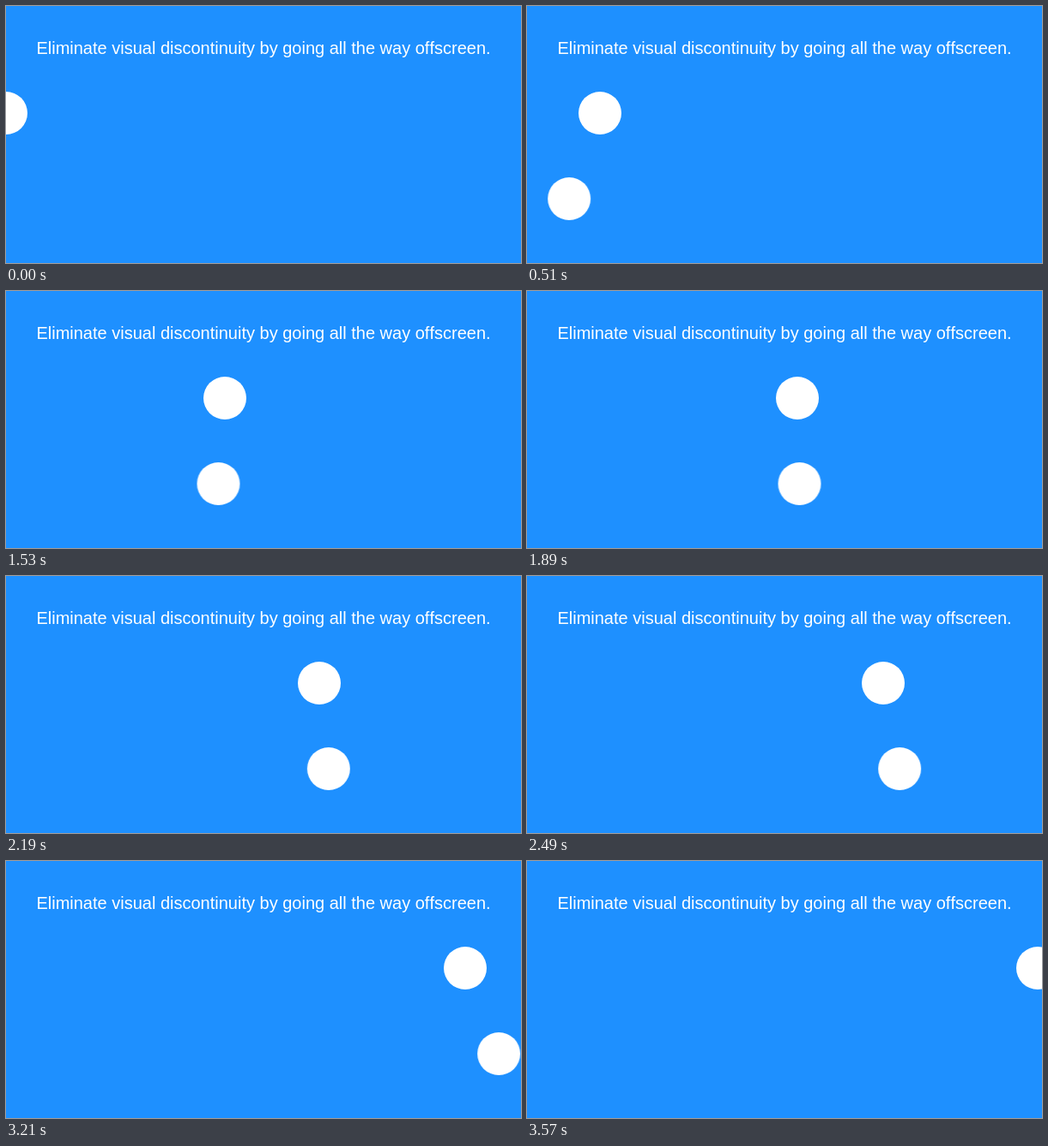
Animation of 600x300 px, one loop 3600 ms. Source, as an HTML page:

```html
<!DOCTYPE html>
<html lang="en">
<head>
<meta charset="utf-8">
<title>Offscreen loop</title>
<style>
  html, body { margin: 0; width: 100%; height: 100%; overflow: hidden; background: #1e90ff; }
  svg { display: block; width: 600px; height: 300px; fill: #fff; }
  text { font: 20px "Liberation Sans", Helvetica, Arial, sans-serif; font-kerning: none; text-anchor: middle; }
</style>
</head>
<body>
<svg viewBox="0 0 600 300">
  <text x="300" y="56">Eliminate visual discontinuity by going all the way offscreen.</text>
  <circle id="edge" cy="125" r="25"/>
  <circle id="beyond" cy="225" r="25"/>
</svg>
<script>
  const LOOP = 3600, TICK = 30;

  function slide(id, from, to) {
    document.getElementById(id).animate(
      [from, to].map(x => ({ transform: `translateX(${x}px)` })),
      // the small lead keeps rounding from delaying a step
      { duration: LOOP, delay: -1, iterations: Infinity, easing: `steps(${LOOP / TICK})` }
    );
  }

  slide("edge", 0, 600);
  slide("beyond", -50, 650);
</script>
</body>
</html>
```
